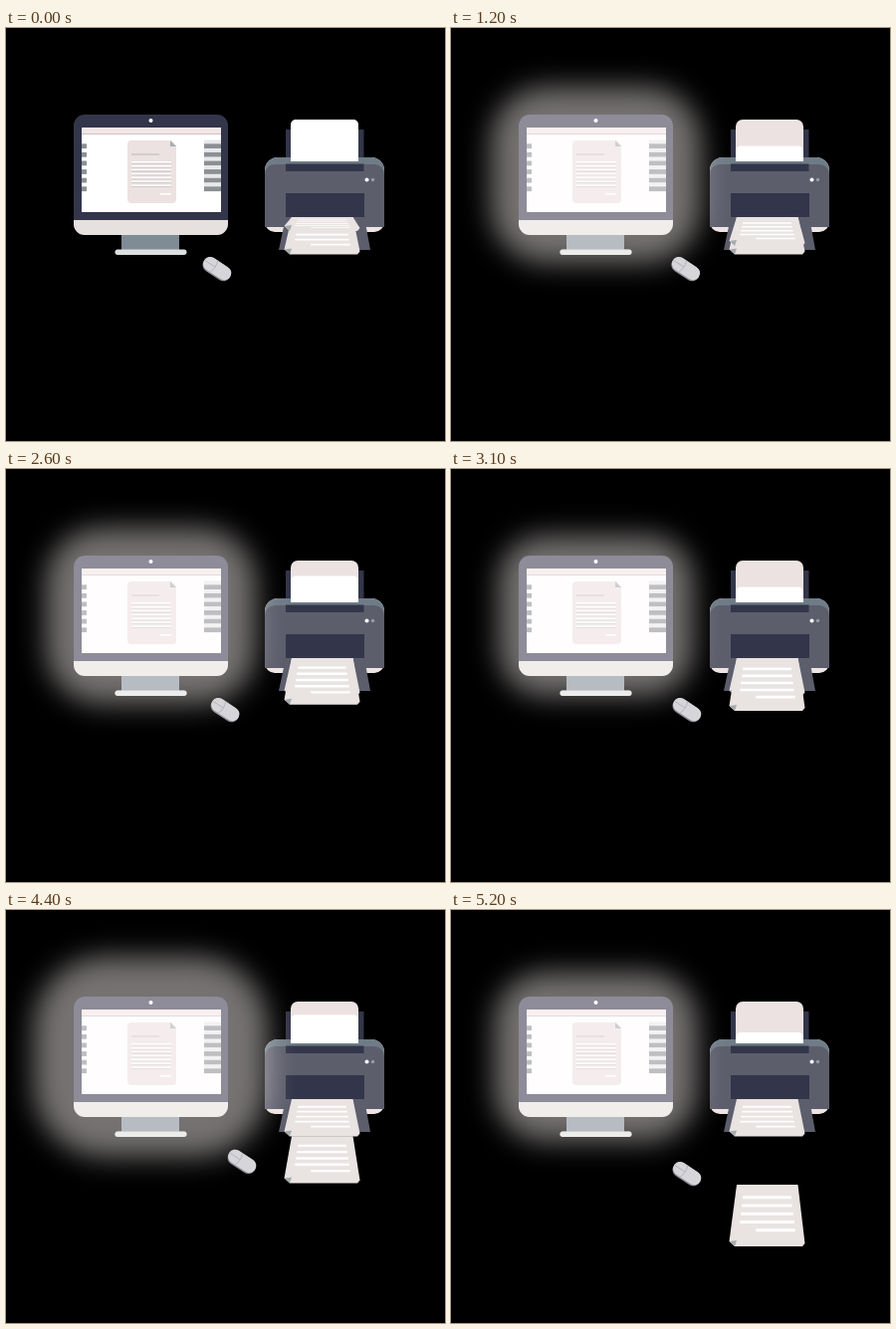
Write an HTML page with a canvas that moves like this. It is 441 px wide and 415 px high and loops after 5.3 s.

```html
<!DOCTYPE html>
<html lang="en">
<head>
<meta charset="utf-8">
<title>Printing a document</title>
<style>
html, body { margin: 0; width: 100%; height: 100%; overflow: hidden; background: #000; }
canvas { display: block; }
</style>
</head>
<body>
<canvas id="stage" width="441" height="415"></canvas>
<script>
const ctx = document.getElementById('stage').getContext('2d');
const LOOP = 5300, STEP = 100;
const DARK = '#33364a', BODY = '#5d5e6c', SLATE = '#6f7c87', PAPER = '#e9e3e2', FEED = '#ebe2e1';
const TRAY_TOP = 190, DROP_START = 3100;

// Progress from 0 to 1 between two times.
const ramp = (t, from, to) => Math.min(1, Math.max(0, (t - from) / (to - from)));
const ease = (t, from, to) => {
  const u = ramp(t, from, to);
  return u * u * (3 - 2 * u);
};

function box(x, y, w, h, color, radius = 0) {
  ctx.fillStyle = color;
  ctx.beginPath();
  ctx.roundRect(x, y, w, h, radius);
  ctx.fill();
}

function poly(color, ...points) {
  ctx.fillStyle = color;
  ctx.beginPath();
  points.forEach(p => ctx.lineTo(...p));
  ctx.fill();
}

function dot(x, y, r, color) {
  box(x - r, y - r, 2 * r, 2 * r, color, r);
}

function glow(t) {
  const spread = 30 + 10 * Math.cos((t - 1900) / 2450 * 2 * Math.PI);
  ctx.save();
  ctx.filter = 'blur(14px)';
  box(68 - spread, 87 - spread, 155 + 2 * spread, 121 + 2 * spread,
    'rgba(255,248,246,.46)', 20 + spread * 1.3);
  ctx.restore();
}

function monitor(lit) {
  box(116, 207, 58, 17, '#7f8b95');
  box(109.5, 222.5, 72, 5.5, '#dce0df', 2.7);
  box(68, 87, 155, 121, DARK, 11);
  box(68, 193, 155, 15, '#e6e1df', [0, 0, 11, 11]);
  box(76, 100, 140, 85, '#fff');
  box(76, 100, 140, 6.5, '#f3e6e6');
  box(76, 106, 140, 1, '#c9c4c6');

  for (let i = 0; i < 6; i++) {
    const y = 112.5 + i * 8.6;
    box(76, y + 3.8, 5, 4.8, '#8b9095');
    box(199, y, 17, 3.8, '#e8e8ea');
    box(199, y + 3.8, 17, 4.8, '#8b9095');
  }

  box(122, 113, 49, 63, '#ece2e1', 4);
  poly('#fff', [165, 112], [172, 112], [172, 119]);
  poly('#a9adb1', [165, 113], [165, 119], [171, 119]);
  box(126, 126.5, 28, 1, '#b9b6b8');
  for (let i = 0; i < 7; i++) {
    const y = 134 + i * 3.9;
    box(126, y, 40, 1.8, '#fff');
    box(126, y + 1.8, 40, .8, '#c3bec0');
  }
  box(155, 166, 11, 1.5, '#fff');

  if (lit) {
    const veil = 'rgba(255,250,250,.44)';
    box(68, 87, 155, 121, veil, 11);
    box(116, 208, 58, 14.5, veil);
    box(109.5, 222.5, 72, 5.5, veil, 2.7);
  }
  dot(145.5, 93, 2, '#fff');
}

function sheet(top, bottom) {
  const h = bottom - top;
  if (h <= 0) return;
  ctx.save();
  ctx.translate(0, top);
  poly(PAPER, [287, 0], [348.5, 0], [355.5, h - 3], [353, h], [285, h], [279.5, h - 5]);
  poly('#a5abac', [280, h - 5], [287, h - 6], [285, h]);
  for (let i = 0; i < 5; i++) {
    const left = i < 4 ? 293 - i : 306;
    box(left, h * (.18 + .133 * i), 342 + i - left, h * .05, '#fff', 1);
  }
  ctx.restore();
}

function outputSheets(t) {
  const drop = ramp(t, DROP_START, 5200);
  const printed = ramp(t, 0, DROP_START);
  const top = TRAY_TOP + 86 * drop ** 1.75;
  const bottom = 204 + 39 * printed + 95 * drop ** 2.3;
  if (!drop) sheet(TRAY_TOP, 227.5);
  sheet(top, bottom);
  sheet(TRAY_TOP, TRAY_TOP + 37.5 * ramp(t, 3500, 4200));
}

function printer(t) {
  const feed = 92 + 42 * (t % 1900 / 1900);
  box(281, 102, 78.5, 42, DARK);
  box(286, 92, 68, 42, FEED, [7, 7, 0, 0]);
  box(286, feed, 68, 134 - feed, '#fff', [5, 5, 0, 0]);

  ctx.save();
  ctx.beginPath();
  ctx.rect(260, 130, 26, 80);
  ctx.rect(354, 130, 26, 80);
  ctx.rect(286, 134, 68, 71);
  ctx.clip();
  box(260, 130, 120, 75, '#eee4e4', [13, 13, 10, 10]);
  box(260, 130, 120, 69, SLATE, [13, 13, 0, 0]);
  box(260, 137, 120, 63, BODY, [10, 10, 0, 0]);
  ctx.restore();

  box(281, 136.5, 78.5, 7.5, DARK);
  box(281, 166, 79, 30, DARK);
  dot(362.5, 152.5, 2, '#fff');
  dot(368.5, 152.5, 1.8, '#9698a3');
  poly(BODY, [281, 190], [360, 190], [366, 223], [274, 223]);
  outputSheets(t);
}

function mouse(t) {
  const x = 212 + 29 * ease(t, 0, 500) - 25 * ease(t, 700, 2400) + 21 * ease(t, 2400, 3100);
  const y = 242 + 23 * ramp(t, 3700, 5200);
  ctx.save();
  ctx.translate(x, y);
  ctx.rotate(.58);
  box(-15.5, -7, 31, 15, '#96979e', 7.5);
  box(-15.5, -7.5, 31, 14, '#d5d5da', 7);
  ctx.strokeStyle = '#a2a3aa';
  ctx.lineWidth = .6;
  ctx.beginPath();
  ctx.moveTo(-4, -7.5);
  ctx.quadraticCurveTo(-1, 0, -4, 6.5);
  ctx.moveTo(-15, -.5);
  ctx.lineTo(-3, -.5);
  ctx.stroke();
  ctx.restore();
}

const start = performance.now();

function draw() {
  const t = Math.floor((performance.now() - start) % LOOP / STEP) * STEP;
  const lit = t > 0;
  ctx.fillStyle = '#000';
  ctx.fillRect(0, 0, 441, 415);
  printer(t);
  if (lit) glow(t);
  monitor(lit);
  mouse(t);
  requestAnimationFrame(draw);
}

draw();
</script>
</body>
</html>
```
